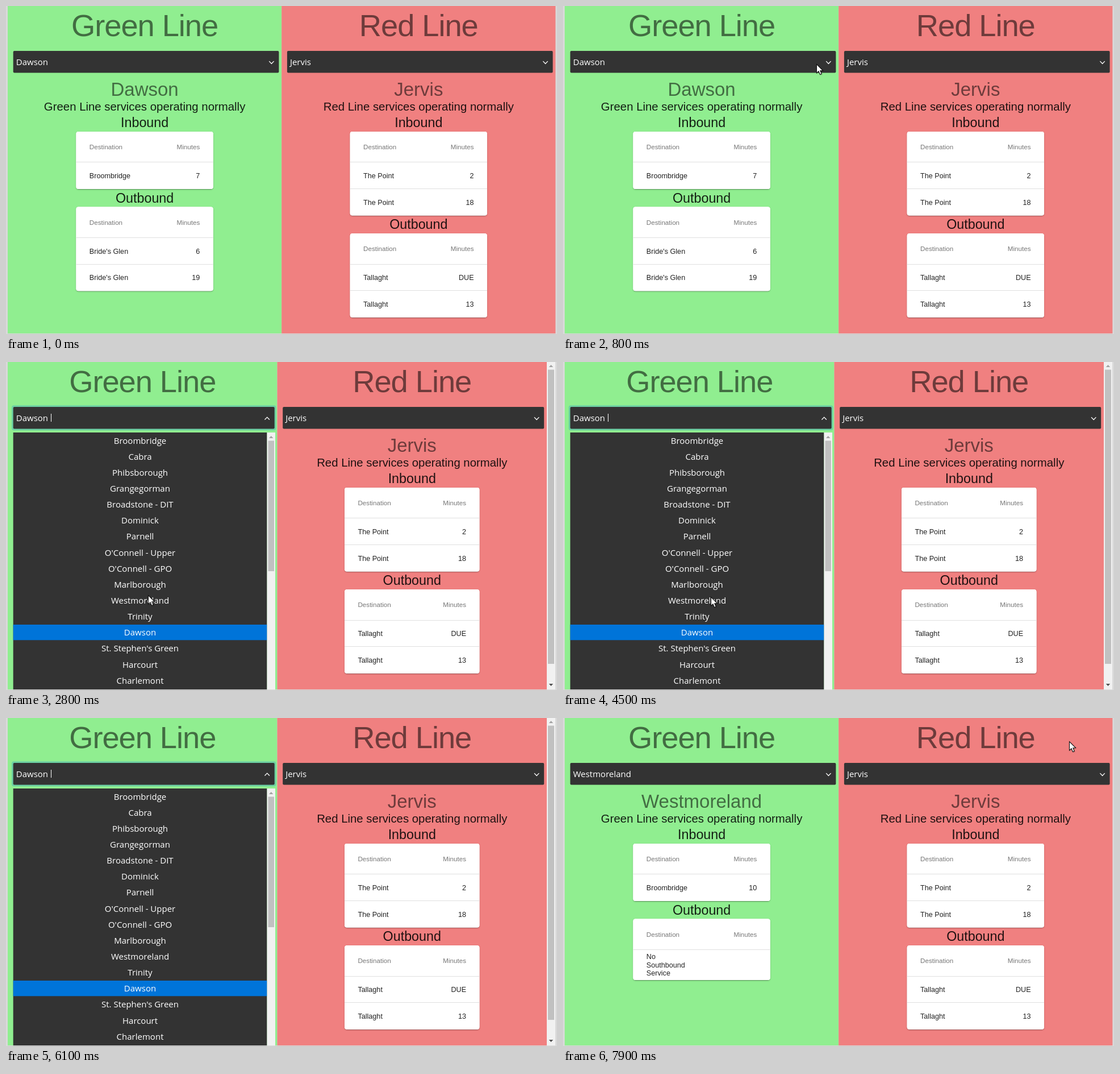
Write an HTML page with a canvas that moves like this. It is 970 by 577 pixels and loops after 8000 ms.

```html
<!DOCTYPE html>
<html lang="en">
<head>
<meta charset="utf-8">
<title>Tram times</title>
<style>
  html, body { margin: 0; width: 100%; height: 100%; overflow: hidden; background: #d9d9d9; }
  canvas { display: block; width: 100%; height: 100%; }
</style>
</head>
<body>
<canvas id="stage" width="970" height="577"></canvas>
<script>
const ctx = document.getElementById('stage').getContext('2d');
const LOOP = 8000, OPEN_AT = 1700, CLOSE_AT = 6300;
const ZOOM = 0.971;
const SANS = '"Liberation Sans", Arial, sans-serif';
const UI = '"Open Sans", "Noto Sans", sans-serif';
const INK = 'rgba(0,0,0,.87)', FAINT = 'rgba(0,0,0,.54)', DARK = '#333';
const STOPS = ['Broombridge', 'Cabra', 'Phibsborough', 'Grangegorman', 'Broadstone - DIT',
  'Dominick', 'Parnell', "O'Connell - Upper", "O'Connell - GPO", 'Marlborough', 'Westmoreland',
  'Trinity', 'Dawson', "St. Stephen's Green", 'Harcourt', 'Charlemont'];

// Pointer positions: [start ms, x, y]; a lone time hides the pointer.
const POINTER = [
  [500, 451, 72], [600, 449, 85], [700, 447, 96], [800, 446, 102], [1700, 445, 102],
  [2000, 405, 160], [2100, 359, 231], [2300, 340, 267], [2500, 271, 366],
  [2700, 258, 392], [2800, 250, 410], [2900, 247, 420],
  [4500, 260, 413], [4600, 288, 410], [4700, 308, 409],
  [5500, 540, 330], [5600, 775, 253], [5800, 952, 265], [6000, 960, 256], [6100],
  [7900, 891, 41]
];

function rect(x, y, w, h, color, radius = 0) {
  ctx.fillStyle = color;
  ctx.beginPath();
  ctx.roundRect(x, y, w, h, radius);
  ctx.fill();
}

function polygon(points, color) {
  ctx.fillStyle = color;
  ctx.beginPath();
  for (const [x, y] of points) ctx.lineTo(x, y);
  ctx.closePath();
  ctx.fill();
}

function text(label, x, baseline, size, color, align = 'left', family = SANS, spacing = 0) {
  ctx.font = `${size}px ${family}`;
  ctx.letterSpacing = spacing + 'px';
  ctx.textAlign = align;
  ctx.fillStyle = color;
  ctx.fillText(label, x, baseline);
}

function shadowedPaper(x, y, w, h) {
  for (const [offset, blur, alpha, inset] of [[1, 3, .2, 0], [1, 1, .14, 0], [2, 1, .12, 1]]) {
    ctx.save();
    ctx.shadowColor = `rgba(0,0,0,${alpha})`;
    ctx.shadowBlur = blur;
    ctx.shadowOffsetY = offset;
    rect(x + inset, y + inset, w - 2 * inset, h - 2 * inset, '#fff', 4);
    ctx.restore();
  }
  rect(x, y, w, h, '#fff', 4);
}

// Draws a timetable and returns its bottom edge.
function timetable(x, y, w, rows) {
  const left = x + 24 * ZOOM, right = x + w - 24 * ZOOM;
  const cell = 13 * ZOOM, head = 12 * ZOOM, headHeight = 56 * ZOOM;
  const heights = rows.map(([name]) => name.includes('\n') ? 53 : 48 * ZOOM);
  const total = headHeight + heights.reduce((sum, h) => sum + h, 0);
  shadowedPaper(x, y, w, total);
  text('Destination', left, Math.round(y + 31), head, FAINT);
  text('Minutes', right, Math.round(y + 31), head, FAINT, 'right');
  let top = y + headHeight;
  rows.forEach(([name, minutes], i) => {
    rect(x, Math.round(top - 1), w, 1, '#e0e0e0');
    const lines = name.split('\n');
    lines.forEach((line, n) => {
      const middle = top + heights[i] / 2 + (n - (lines.length - 1) / 2) * 14.5;
      text(line, left, Math.round(middle + 4.3), cell, INK);
    });
    text(minutes, right, Math.round(top + heights[i] / 2 + 4.3), cell, INK, 'right');
    top += heights[i];
  });
  return y + total;
}

function select(x, w, value, open) {
  if (open) rect(x - 2.7, 76.3, w + 5.4, 43.9, 'rgba(0,116,217,.25)', 4);
  rect(x, 79, w, 38.5, DARK, 2);
  text(value, x + 5, 104, 15, '#fff', 'left', UI);
  const cx = x + w - 13, bend = open ? -2.2 : 2.2;
  ctx.strokeStyle = '#fff';
  ctx.lineWidth = 1.3;
  ctx.beginPath();
  ctx.moveTo(cx - 4.2, 99.3 - bend);
  ctx.lineTo(cx, 99.3 + bend);
  ctx.lineTo(cx + 4.2, 99.3 - bend);
  ctx.stroke();
}

function panel(x, w, color, line, stop, inbound, outbound, open) {
  const mid = x + w / 2, paperX = x + w / 4;
  rect(x, 0, w, 576, color);
  text(line, mid, 53, 56 * ZOOM, FAINT, 'center', SANS, -1.09);
  select(x + 9.7, w - 14.5, stop, open);
  if (open) return;
  text(stop, mid, 158, 34 * ZOOM, FAINT, 'center');
  text(line + ' services operating normally', mid, 184, 21 * ZOOM, INK, 'center');
  text('Inbound', mid, 213, 24 * ZOOM, INK, 'center');
  const bottom = timetable(paperX, 221, w / 2, inbound);
  text('Outbound', mid, Math.round(bottom + 23.6), 24 * ZOOM, INK, 'center');
  timetable(paperX, bottom + 31.6, w / 2, outbound);
}

function arrow(cx, cy, dir, color) {
  polygon([[cx - 3.7, cy + 2 * dir], [cx + 3.7, cy + 2 * dir], [cx, cy - 2 * dir]], color);
}

function scrollbar(x, y, w, h, thumbHeight) {
  rect(x, y, w, h, '#f1f1f1');
  rect(x + 2, y + 14.5, w - 4, thumbHeight, '#c1c1c1');
  arrow(x + w / 2, y + 8, 1, '#a3a3a3');
}

function dropdown() {
  rect(12.7, 124, 446.8, 452, DARK);
  STOPS.forEach((stop, i) => {
    const top = 124.4 + i * 28.14;
    if (stop === 'Dawson') rect(12.7, Math.round(top), 446.8, 27.3, '#0074d9');
    text(stop, 236, Math.round(top + 19.2), 15, '#fff', 'center', UI);
  });
  scrollbar(459.5, 124, 14.5, 452, 229.5);
  rect(79, 91, 1, 14, '#fff');
}

function pointer(x, y) {
  ctx.save();
  ctx.translate(x + .5, y + .5);
  ctx.beginPath();
  for (const [px, py] of [[0, 0], [0, 15.5], [3.5, 12.2], [6, 18], [8.7, 16.9], [6.3, 11.2], [11, 11]])
    ctx.lineTo(px, py);
  ctx.closePath();
  ctx.shadowColor = 'rgba(0,0,0,.3)';
  ctx.shadowBlur = 2;
  ctx.shadowOffsetX = ctx.shadowOffsetY = 1;
  ctx.fillStyle = '#fff';
  ctx.fill();
  ctx.shadowColor = 'transparent';
  ctx.strokeStyle = '#111';
  ctx.lineWidth = 1.1;
  ctx.stroke();
  ctx.restore();
}

function draw(t) {
  const open = t >= OPEN_AT && t < CLOSE_AT, arrived = t >= CLOSE_AT;
  const width = open ? 474.5 : 482.2;
  rect(0, 0, 970, 577, '#d9d9d9');
  panel(3, width, '#90ee90', 'Green Line', arrived ? 'Westmoreland' : 'Dawson',
    [['Broombridge', arrived ? '10' : '7']],
    arrived ? [['No\nSouthbound\nService', '']] : [["Bride's Glen", '6'], ["Bride's Glen", '19']],
    open);
  panel(3 + width, width, '#f08080', 'Red Line', 'Jervis',
    [['The Point', '2'], ['The Point', '18']], [['Tallaght', 'DUE'], ['Tallaght', '13']], false);
  if (open) {
    dropdown();
    scrollbar(952, -1, 15, 577, 517.5);
    arrow(959.5, 568, -1, '#505050');
  }
  const spot = POINTER.findLast(([start]) => start <= t);
  if (spot && spot.length > 1) pointer(spot[1], spot[2]);
}

const startTime = performance.now();
function tick() {
  draw((performance.now() - startTime) % LOOP);
  requestAnimationFrame(tick);
}
tick();
</script>
</body>
</html>
```
